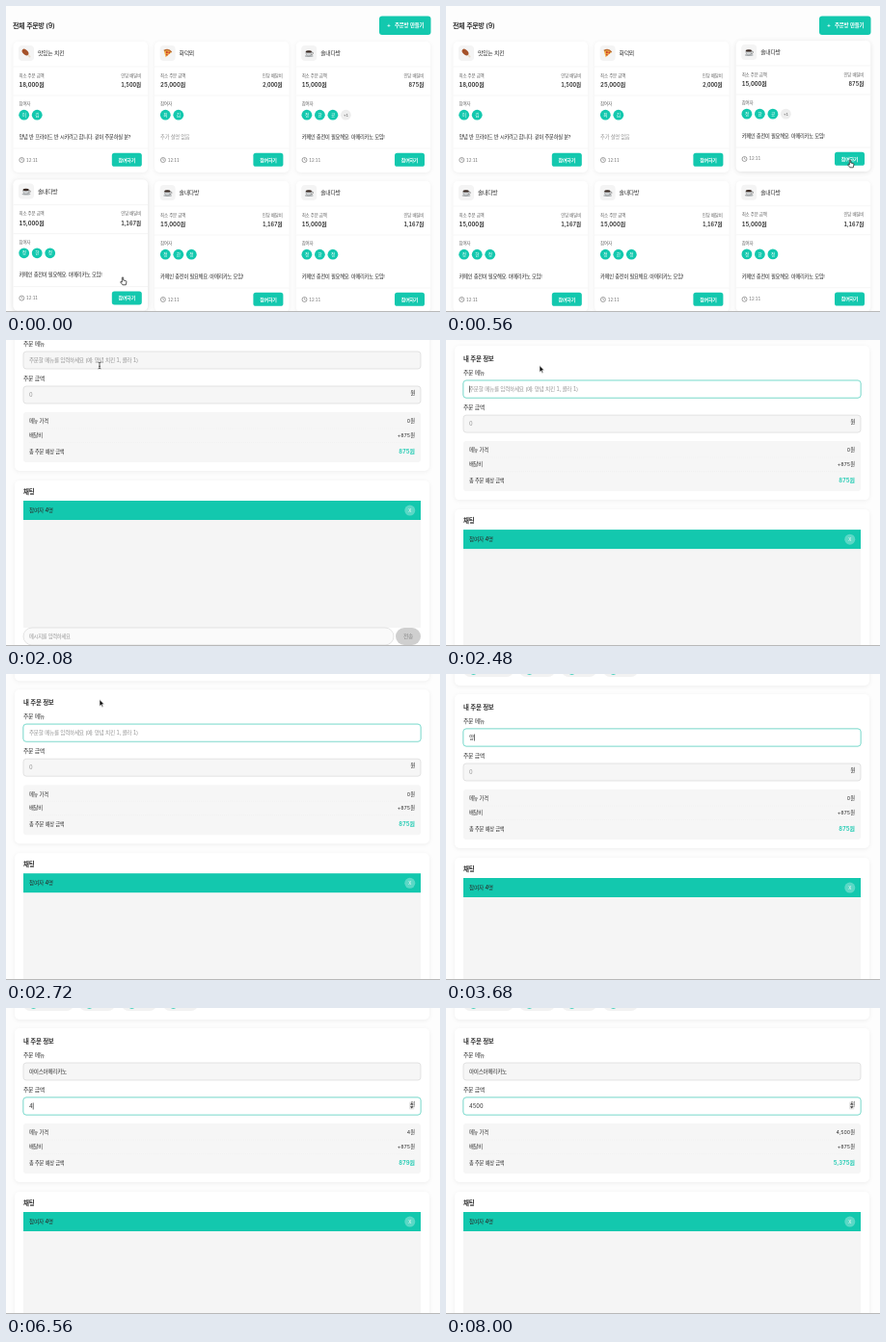
An HTML page that plays this animation: 450x318 px, repeating every 8080 ms.

```html
<!DOCTYPE html>
<html lang="ko">
<head>
<meta charset="utf-8">
<title>주문방</title>
<style>
  html, body { margin: 0; width: 100%; height: 100%; overflow: hidden; background: #fdfdfd; }
  svg { display: block; width: 450px; height: 318px; }
  text {
    font-family: Inter, "Noto Sans CJK KR", "Noto Sans CJK", "Noto Sans KR", sans-serif;
    font-variant-numeric: tabular-nums; white-space: pre;
  }
  .ko { letter-spacing: -.05em; word-spacing: .06em; }
  .card { fill: #fff; filter: drop-shadow(0 1px 2px rgba(0, 0, 0, .06)); }
  .lifted { fill: #fff; filter: drop-shadow(0 1.5px 3px rgba(0, 0, 0, .08)); }
</style>
</head>
<body>
<svg id="stage" viewBox="0 0 450 318" xmlns="http://www.w3.org/2000/svg"></svg>
<script>
const LOOP = 8080, TEAL = '#13c8ae', INK = '#2b2b2b', MUTED = '#666', HINT = '#959595';
const FEE = 875;

// ---------- drawing helpers (text y is the visual middle) ----------
const text = (x, y, str, size, o = {}) =>
  `<text ${o.id ? `id="${o.id}"` : ''} x="${x}" y="${y + size * .36}" font-size="${size}" fill="${o.fill || INK}"
    font-weight="${o.weight || 400}" text-anchor="${o.anchor || 'start'}"
    class="${/^[가-힣]/.test(str) || o.ko ? 'ko' : ''}">${str}</text>`;
const rect = (x, y, w, h, r, fill, extra = '') =>
  `<rect x="${x}" y="${y}" width="${w}" height="${h}" rx="${r}" fill="${fill}" ${extra}/>`;
const circle = (x, y, r, fill, extra = '') =>
  `<circle cx="${x}" cy="${y}" r="${r}" fill="${fill}" ${extra}/>`;
const rule = (x, y, w, extra = '') =>
  `<path d="M${x} ${y}h${w}" stroke="#ececec" stroke-width=".5" ${extra}/>`;
const group = (id, body, extra = '') => `<g id="${id}" ${extra}>${body}</g>`;

const icons = {
  leg: `<g transform="rotate(45)"><rect x="0" y="-.9" width="6" height="1.8" rx=".9" fill="#e9dcc8"/>
    <ellipse cx="-1.4" rx="4" ry="2.5" fill="#a5522a"/></g>`,
  pizza: `<path d="M-3.8-2.6Q1-5 4-1L-2 4.2Z" fill="#f0b54a"/>
    <path d="M-3.8-2.6Q1-5 4-1" fill="none" stroke="#b9692f" stroke-width="1.4"/>
    ${circle(-.8, -.8, 1.1, '#cf3f2c')}${circle(-.8, 1.7, .9, '#cf3f2c')}${circle(1.6, -.5, .9, '#cf3f2c')}`,
  cup: `<ellipse cy="2.9" rx="4.4" ry="1" fill="#aeb3b6"/>
    <path d="M-3.4-1.6h6.2q0 4.6-3.1 4.6t-3.1-4.6z" fill="#cfd3d5" stroke="#777" stroke-width=".4"/>
    <path d="M2.8-1q2 0 1.4 1.5t-2 1" fill="none" stroke="#777" stroke-width=".7"/>
    <ellipse cx="-.3" cy="-1.6" rx="3.1" ry="1.2" fill="#3b2b24"/>`
};
const icon = (x, y, kind) => rect(x - 8, y - 8, 16, 16, 4, '#f4f4f4') +
  `<g transform="translate(${x} ${y})">${icons[kind]}</g>`;

// ---------- room list ----------
const cafe = (fee, people) => ({
  icon: 'cup', name: '솔내다방', min: '15,000원', fee, people,
  note: '카페인 충전이 필요해요. 아메리카노 모임!'
});
const rooms = [
  { icon: 'leg', name: '맛있는 치킨', min: '18,000원', fee: '1,500원', people: '이김',
    note: '양념 반 프라이드 반 시키려고 합니다. 같이 주문하실 분?' },
  { icon: 'pizza', name: '화덕뫼', min: '25,000원', fee: '2,000원', people: '최김' },
  cafe('875원', '정한공+'), cafe('1,167원', '정한정'), cafe('1,167원', '정한정'), cafe('1,167원', '정한정')
];
// [hover start, hover end] for the rooms the pointer crosses
const hovers = { 2: [430, 2000], 3: [-400, 150], 4: [176, 344], 5: [350, 416] };

const avatar = (c, i) => {
  const x = 11.2 + i * 13.5, more = c === '+';
  return circle(x, 76.2, 5.4, more ? '#eee' : TEAL) +
    text(x, 76.2, more ? '+1' : c, more ? 3.8 : 4.6, { fill: more ? MUTED : '#fff', anchor: 'middle', weight: 500 });
};
const roomCard = (r, i) => {
  const x = 7.5 + (i % 3) * 146.6, y = 37 + (i > 2 ? 145 : 0), end = { anchor: 'end' };
  return `<g transform="translate(${x} ${y})">` + group('room' + i,
    rect(0, 0, 139.5, 136, 5, '#fff', 'class="card"') +
    rect(0, 0, 139.5, 136, 5, '#fff', `class="lifted" id="glow${i}" opacity="0"`) +
    icon(13.5, 12, r.icon) + text(25.5, 12, r.name, 5.9, { weight: 500 }) + rule(0, 26, 139.5) +
    text(6, 35, '최소 주문 금액', 4.5, { fill: MUTED }) + text(132.6, 35, '인당 배달비', 4.5, { ...end, fill: MUTED }) +
    text(6, 45, r.min, 5.9, { weight: 600 }) + text(132.6, 45, r.fee, 5.5, { ...end, weight: 600 }) +
    rule(0, 56, 139.5) + text(6, 64.5, '참여자', 4.5, { fill: MUTED }) +
    [...r.people].map(avatar).join('') +
    text(6, 99, r.note || '추가 설명 없음', 5.25, { fill: r.note ? '#222' : HINT }) +
    rule(0, 111, 139.5) +
    circle(8.8, 123, 2.5, 'none', `stroke="${MUTED}" stroke-width=".6"`) +
    `<path d="M8.8 121.4v1.6l1.1.7" fill="none" stroke="${MUTED}" stroke-width=".5"/>` +
    text(13.6, 123, '12:11', 4.2, { fill: MUTED }) +
    rect(102.3, 115.8, 31, 14, 2.6, TEAL) +
    text(117.8, 122.8, '참여하기', 5, { fill: '#fff', weight: 600, anchor: 'middle' })) + '</g>';
};
const list = text(7, 20, '전체 주문방 (9)', 7, { weight: 600 }) +
  rect(387, 10.6, 53.5, 19.4, 3, TEAL) + text(395, 20.3, '+', 6, { fill: '#fff', weight: 600 }) +
  text(403, 20.3, '주문방 만들기', 5.5, { fill: '#fff', weight: 600 }) +
  rooms.map(roomCard).join('');

// ---------- order room ----------
const field = (id, y) =>
  rect(18, y, 412, 18, 3, '#f6f6f6', 'stroke="#d9d9d9" stroke-width=".7"') +
  group(id + 'Focus',
    rect(17.5, y - .5, 413, 19, 3.4, 'none', `stroke="${TEAL}" stroke-opacity=".12" stroke-width="1"`) +
    rect(18, y, 412, 18, 3, '#fff', `stroke="${TEAL}" stroke-opacity=".75" stroke-width=".6"`), 'opacity="0"') +
  text(24, y + 9, '', 5.6, { id, ko: id === 'menu' }) +
  rect(0, y + 5.5, .6, 7, 0, '#111', `id="${id}Caret"`);
const row = (y, label, id, o = {}) => text(24, y, label, 5.25, { weight: o.weight && 500 }) +
  text(424, y, '', o.size || 5.2, { id, anchor: 'end', ...o });
const member = ([x, w, c, name]) => rect(x, -28, w, 14, 7, '#f2f2f2') +
  circle(x + 10.5, -20.8, 4.6, TEAL) + text(x + 10.5, -20.8, c, 4.4, { fill: '#fff', anchor: 'middle' }) +
  text(x + 18, -20.8, name, 4.9);
const dots = 'stroke-dasharray="1 1"';

const room =
  rect(9, -178, 430, 173, 5, '#fff', 'class="card"') +
  icon(26, -160, 'cup') + text(39, -160, '솔내다방', 6.3, { weight: 600 }) + rule(18, -144, 412) +
  text(18, -132, '최소 주문 금액', 4.9, { fill: MUTED }) + text(18, -121, '15,000원', 5.9, { weight: 600 }) +
  text(18, -104, '인당 배달비', 4.9, { fill: MUTED }) + text(18, -93, '875원', 5.9, { weight: 600 }) +
  text(18, -73, rooms[2].note, 5.25) + rule(18, -58, 412) +
  text(18, -41, '참여자 (4)', 5.8, { weight: 500 }) +
  [[18, 52, '정', '나 (방장)'], [76, 37, '한', '한별'], [120, 36, '공', '공기'], [163, 36, '정', '정오']].map(member).join('') +
  rect(9, 4, 430, 160, 5, '#fff', 'class="card"') +
  text(18, 17.2, '내 주문 정보', 6.4, { weight: 600 }) +
  text(18, 32, '주문 메뉴', 5.8, { weight: 500 }) + field('menu', 40) +
  text(18, 68, '주문 금액', 5.8, { weight: 500 }) + field('price', 76) +
  text(424, 83.2, '원', 5.6, { anchor: 'end', weight: 500 }) +
  group('spin', rect(418, 80.4, 5.4, 8, 1, '#d8d8d8', 'opacity=".6"') +
    '<path d="M419 83.6l1.7-2.2 1.7 2.2zM419 85.2l1.7 2.2 1.7-2.2z" fill="#444"/>') +
  rect(18, 103, 412, 52, 3, '#f6f6f6') +
  row(112.5, '메뉴 가격', 'cost') + rule(24, 120, 400, dots) +
  row(126.8, '배달비', 'fee') + rule(24, 134.5, 400, dots) +
  row(144, '총 주문 예상 금액', 'total', { size: 5.9, fill: TEAL, weight: 600 }) +
  rect(9, 174, 430, 190, 5, '#fff', 'class="card"') +
  text(18, 185.8, '채팅', 6.5, { weight: 600 }) +
  rect(18, 215, 412, 112, 0, '#f5f5f5') + rect(18, 195, 412, 20, 0, TEAL) +
  text(24, 205.1, '참여자 4명', 5.7, { weight: 500 }) +
  circle(418.8, 205.1, 5.5, '#fff', 'fill-opacity=".3"') +
  text(418.8, 205.1, 'X', 4.6, { fill: '#fff', anchor: 'middle' }) +
  rect(18, 327, 384, 18, 9, '#fafafa', 'stroke="#d9d9d9" stroke-width=".7"') +
  text(24, 336, '메시지를 입력하세요', 5.25, { fill: HINT }) +
  rect(404, 327, 26, 18, 9, '#cfcfcf') + text(417, 336, '전송', 5.8, { fill: '#888', anchor: 'middle' });

// ---------- pointers, hot spot at 0,0 ----------
const outline = 'stroke="#fff" stroke-width=".6" stroke-linejoin="round"';
const pointer =
  `<path id="arrow" d="M0 0v7l1.6-1.5 1.2 2.6 1.1-.5-1.2-2.5h2.2z" fill="#111" ${outline}/>` +
  `<path id="hand" d="M-.7.2q.7-.8 1.4 0v2.8l2.6.6q.8.3.6 1.3l-.6 2.9h-3.4l-2.3-3q.3-1 1.7.2z" fill="#fff"
     stroke="#111" stroke-width=".7" stroke-linejoin="round"/>` +
  `<path id="beam" d="M-1.4-3.3q1.4 0 1.4.8v5q0 .8-1.4.8M1.4-3.3q-1.4 0-1.4.8M0 2.5q0 .8 1.4.8M-.8 .8h1.6"
     fill="none" stroke="#222" stroke-width=".7"/>`;

const stage = document.getElementById('stage');
stage.innerHTML = rect(0, 0, 450, 318, 0, '#fdfdfd') + group('list', list) + group('room', room) +
  rect(0, 317, 450, 1, 0, '#b8b8b8') + group('cursor', pointer);

// ---------- motion ----------
const el = {};
stage.querySelectorAll('[id]').forEach(n => el[n.id] = n);
const clamp = v => Math.max(0, Math.min(1, v));
const smooth = p => p * p * (3 - 2 * p);
const linear = p => p;
const glide = p => 1 - (1 - p) ** 3.55;
const ramp = (t, start, span = 200) => smooth(clamp((t - start) / span));
const track = (t, keys) => {
  let v = keys[0][1];
  for (let i = 1; i < keys.length; i++) {
    const [a, from] = keys[i - 1], [b, to, ease = smooth] = keys[i];
    if (t >= a) v = from + (to - from) * ease(clamp((t - a) / (b - a)));
  }
  return v;
};
const show = (n, on) => n.setAttribute('display', on ? 'inline' : 'none');
const won = n => n.toLocaleString('en-US') + '원';

const scroll = [[880, 190], [1040, 0, linear], [1600, -28, glide], [2160, -28], [3360, 17, glide]];
const pathX = [[80, 121], [560, 419], [880, 419], [1020, 350], [1500, 350], [2000, 97]];
const pathY = [[80, 282], [560, 160], [880, 160], [1020, 136], [1500, 136], [2000, 26.5]];

// Text after each key press while the syllables are composed
const typed = ['ㅇ', '아', '앙', '아이', '아잇', '아이스', '아이승', '아이스아', '아이스암', '아이스아메',
  '아이스아멜', '아이스아메리', '아이스아메릨', '아이스아메리카', '아이스아메리칸', '아이스아메리카노'];
const TYPE_AT = 3360, KEY = 160, MENU_AT = 2160, PRICE_AT = 6000;
const digitTimes = [6560, 6960, 7200, 7440];

function fill(id, value, hint, caretOn) {
  el[id].textContent = value || hint;
  el[id].setAttribute('fill', value ? INK : HINT);
  show(el[id + 'Caret'], caretOn);
  if (caretOn) el[id + 'Caret'].setAttribute('x', 24 + (value ? el[id].getComputedTextLength() + .2 : 0));
}

function drawList(t) {
  for (const i in hovers) {
    const [on, off] = hovers[i], lift = ramp(t, on) * (1 - ramp(t, off));
    el['room' + i].setAttribute('transform', `translate(0 ${-1.4 * lift})`);
    el['glow' + i].setAttribute('opacity', lift);
  }
}

function drawRoom(t) {
  el.room.setAttribute('transform', `translate(0 ${track(t, scroll)})`);
  const key = Math.min(typed.length - 1, Math.floor((t - TYPE_AT) / KEY));
  const typing = t >= TYPE_AT && t < TYPE_AT + KEY * typed.length;
  const digits = '4500'.slice(0, digitTimes.filter(d => t >= d).length);
  const blink = start => (t - start) % 1000 < 500;
  fill('menu', typed[key], '주문할 메뉴를 입력하세요 (예: 양념 치킨 1, 콜라 1)',
    t >= MENU_AT && t < PRICE_AT && (typing || blink(MENU_AT)));
  fill('price', digits, '0', t >= PRICE_AT && blink(digits ? 7440 : PRICE_AT));
  el.menuFocus.setAttribute('opacity', ramp(t, MENU_AT) - ramp(t, PRICE_AT));
  el.priceFocus.setAttribute('opacity', ramp(t, PRICE_AT));
  show(el.spin, t < 1120 || t >= PRICE_AT);
  el.cost.textContent = won(+digits);
  el.fee.textContent = '+' + won(FEE);
  el.total.textContent = won(FEE + +digits);
}

function draw(t) {
  const inRoom = t >= 880;
  show(el.list, !inRoom);
  show(el.room, inRoom);
  inRoom ? drawRoom(t) : drawList(t);

  show(el.cursor, t < TYPE_AT);
  el.cursor.setAttribute('transform', `translate(${track(t, pathX)} ${track(t, pathY)})`);
  const beam = inRoom && t < 2320;
  show(el.hand, !inRoom);
  show(el.beam, beam);
  show(el.arrow, inRoom && !beam);
}

const start = performance.now();
(function tick() {
  draw((performance.now() - start) % LOOP);
  requestAnimationFrame(tick);
})();
</script>
</body>
</html>
```
